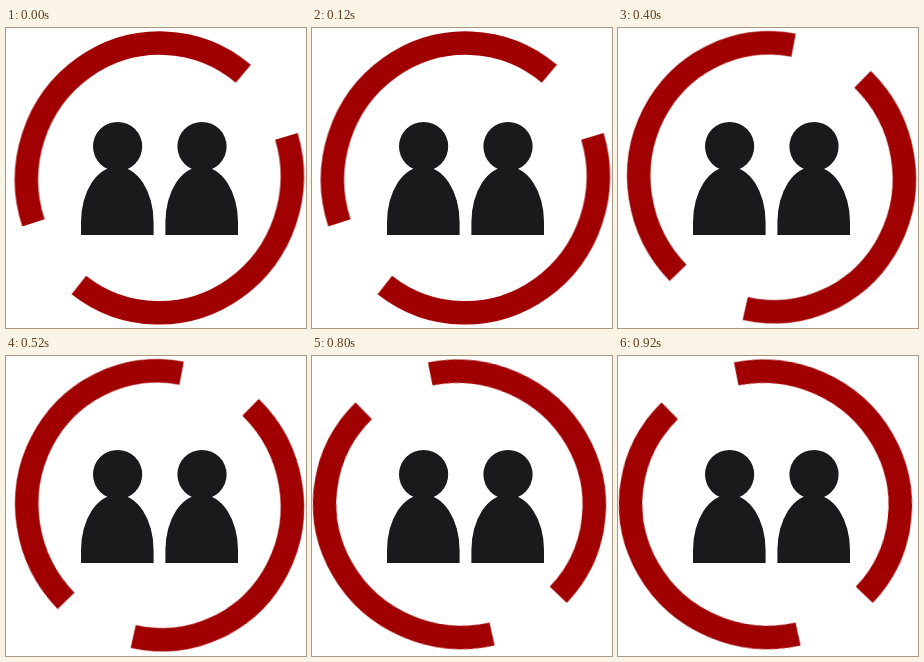
Write an HTML page that moves like this. It is 300 px wide and 300 px high and loops after 1 s.

```html
<!DOCTYPE html>
<html lang="en">
<head>
<meta charset="utf-8">
<title>Two people in a turning ring</title>
<style>
  html, body { margin: 0; width: 100%; height: 100%; overflow: hidden; background: #fff; }
  svg { display: block; width: 100%; height: 100%; }

  .ring {
    fill: none;
    stroke: #a00000;
    stroke-width: 23.5;
    animation: turn 1s step-end infinite;
  }

  /* The ring jumps between five uneven angles and drifts slightly. */
  @keyframes turn {
    0%   { transform: translate(153.4px, 150px); }
    20%  { transform: translate(153.4px, 149.8px) rotate(70.1deg); }
    40%  { transform: translate(153.5px, 149.3px) rotate(152.5deg); }
    60%  { transform: translate(153.5px, 149.5px) rotate(203.6deg); }
    80%, 100% { transform: translate(147.5px, 148.3px) rotate(275.5deg); }
  }
</style>
</head>
<body>
<svg viewBox="0 0 300 300">
  <defs>
    <g id="person" fill="#1a1a1c">
      <circle cx="111.6" cy="118.5" r="24.6"/>
      <path d="M75 207V194A36.3 55.5 0 0 1 147.6 194V207Z"/>
    </g>
  </defs>

  <g class="ring">
    <path d="M-126 44.9A132.25 135.75 8 0 1 83.9 -104.3"/>
    <path d="M127 -41.7A132.25 135.75 8 0 1 -80.6 106.9"/>
  </g>

  <use href="#person"/>
  <use href="#person" x="84.4"/>
</svg>
</body>
</html>
```
